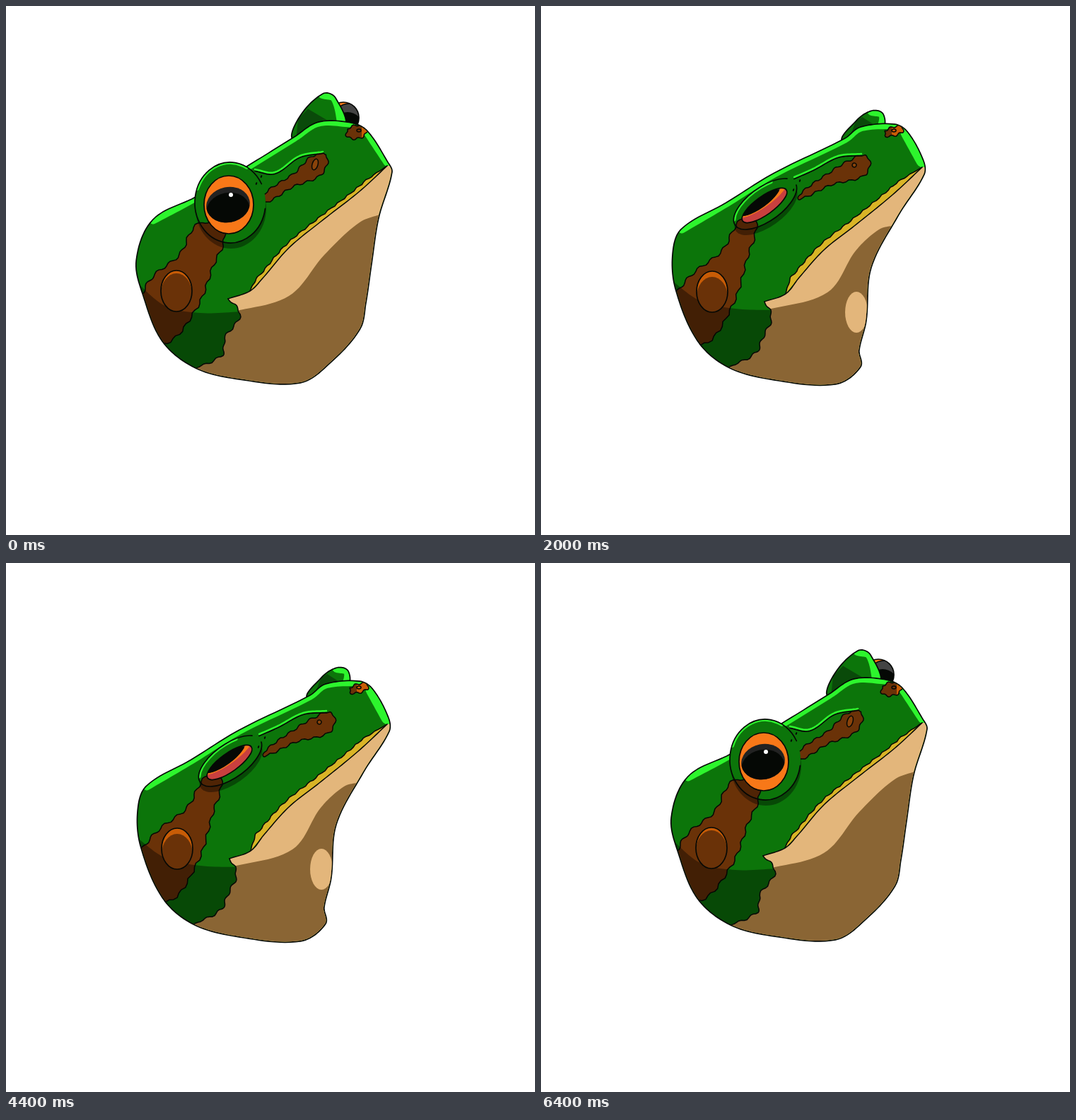
Animation, 748 px wide and 748 px high, one loop 6.5 s. Source, as an HTML page with a canvas:

```html
<!DOCTYPE html>
<html lang="en">
<head>
<meta charset="utf-8">
<title>Croaking frog</title>
<style>
html, body { margin: 0; width: 100%; height: 100%; overflow: hidden; background: #fff; }
canvas { display: block; width: 100vw; height: 100vh; }
</style>
</head>
<body>
<canvas id="stage" width="748" height="748"></canvas>
<script>
const ctx = document.getElementById('stage').getContext('2d');
const GREEN = '#0c750a', DARK = '#0a4a0a', BRIGHT = '#2df52d', BROWN = '#6a3208', RUST = '#c85c06',
  TAN = '#e3b67b', SHADE = '#8a6534', YELLOW = '#d9b426', ORANGE = '#f87818', PINK = '#c8403f',
  INK = '#050805', SHADOW = 'rgba(0,0,0,.38)';

const points = text => text.split(',').map(p => p.trim().split(' ').map(Number));
const mix = (a, b, t) => Array.isArray(a) ? a.map((v, i) => mix(v, b[i], t)) : a + (b - a) * t;

// Key points of each contour: awake, then with the eyes shut.
const contour = (awake, shut) => [points(awake), points(shut)];
const crown = contour('208 303,268 271,345 225,408 186,442 165,488 166,510 177,539 221',
  '199 316,262 279,330 237,430 188,452 172,500 168,518 179,540 219');
const throat = contour('545 235,526 300,516 365,508 420,500 456,460 502,416 532,330 527',
  '541 238,505 295,466 370,459 445,449 487,451 510,416 534,330 528');
const throatPuffed = points('543 240,512 293,470 343,453 371,430 450,410 521,392 539,330 529');
const nape = contour('268 511,222 474,195 410,185 360', '265 510,222 473,191 400,187 350');
const mouth = contour('539 226,500 262,445 305,400 342,362 386,345 403,314 414',
  '539 228,497 267,443 311,400 345,365 384,346 407,316 418');
const cheek = contour('314 414,331 436,309 470,306 493,266 513', '316 418,326 440,314 468,303 491,265 511');
const bellyShade = contour('535 293,500 306,450 352,400 410,318 433', '500 310,478 316,445 346,405 405,318 430');
const sideShade = contour('180 386,225 424,275 434,335 432', '180 384,225 417,275 428,335 430');
const patch = contour('272 308,245 352,208 382,190 412,175 450,222 478,268 430,292 370,308 318',
  '282 303,256 346,215 378,188 412,175 450,226 480,270 425,292 355,304 305');
const stripe = contour('453 210,446 238,405 256,366 278,366 265,408 236,432 213',
  '461 212,459 238,410 253,366 273,368 264,410 234,435 219');
const noseSpot = contour('484 173,508 170,506 184,484 186', '487 176,510 170,510 179,488 184');
const brow = contour('352 231,380 235,415 212,448 206', '358 242,385 230,420 212,453 209');
const farLid = contour('408 190,413 160,448 124,466 130,477 175', '428 192,445 163,468 148,484 153,482 175');
const pores = contour('361 241,354 251', '366 247,357 260');

// Ellipses: centre, radii, tilt.
const ear = [[241, 403, 22, 29, 0], [242, 404, 22, 29, 0]];
const nostril = [[437, 224, 4, 8, .3], [443, 225, 3, 3, .3]];
const farBall = [[477, 158, 22, 22, 0], [466, 165, 14, 14, 0]];
const lid = [[317, 278, 50, 57, 0], [317, 280, 52, 24, -.62]];
const opening = [[315, 281, 35, 41, 0], [316, 282, 38, 13, -.62]];
const iris = [[315, 281, 35, 41, 0], [312, 272, 44, 13, -.62]];
const pupil = [[314, 281, 31, 25, -.2], [308, 274, 36, 12, -.62]];
const sac = [[410, 440, 48, 48, 0], [432, 448, 73, 73, 0]];
const sacLight = [[446, 433, 16, 29, 0], [453, 446, 52, 66, 0]];

// Samples a smooth curve through the points; wave and shift move it along its normal.
function trace(pts, { closed = false, wave = 0, period = 22, shift = 0 } = {}) {
  const n = pts.length, steps = 12, out = [];
  const at = i => pts[closed ? (i + n) % n : Math.max(0, Math.min(n - 1, i))];
  for (let i = 0; i < (closed ? n : n - 1); i++) {
    const p = at(i - 1), a = at(i), b = at(i + 1), q = at(i + 2);
    const third = Math.hypot(b[0] - a[0], b[1] - a[1]) / 3;
    const handle = (from, to, k) => third / Math.hypot(to[0] - from[0], to[1] - from[1]) * (to[k] - from[k]);
    for (let j = 0; j <= steps; j++) {
      if (j === steps && (closed || i < n - 2)) continue;
      const t = j / steps, u = 1 - t;
      out.push([0, 1].map(k => u ** 3 * a[k] + 3 * u * u * t * (a[k] + handle(p, b, k)) +
        3 * u * t * t * (b[k] - handle(a, q, k)) + t ** 3 * b[k]));
    }
  }
  if (!wave && !shift) return out;
  let travelled = 0;
  return out.map(([x, y], i) => {
    const next = out[i + 1] || out[i], prev = out[i - 1] || out[i];
    const dx = next[0] - prev[0], dy = next[1] - prev[1], len = Math.hypot(dx, dy);
    const t = i / (out.length - 1), taper = closed ? 1 : Math.min(1, 8 * t * (1 - t));
    travelled += len / 2;
    const off = taper * (shift + wave * Math.sin(travelled * 2 * Math.PI / period)) / len;
    return [x - dy * off, y + dx * off];
  });
}

function path(pts, closed = false) {
  const result = new Path2D();
  pts.forEach(p => result.lineTo(...p));
  if (closed) result.closePath();
  return result;
}

function oval([x, y, rx, ry, tilt], from = 0, to = 2 * Math.PI) {
  const result = new Path2D();
  result.ellipse(x, y, rx, ry, tilt, from, to);
  return result;
}

const blob = (pts, options) => path(trace(pts, { closed: true, ...options }), true);
const moved = ([x, y, ...rest], dx, dy) => [x + dx, y + dy, ...rest];

function fill(shape, color) { ctx.fillStyle = color; ctx.fill(shape); }
function line(shape, width = 1.7, color = INK) {
  ctx.lineWidth = width;
  ctx.strokeStyle = color;
  ctx.stroke(shape);
}
function inside(shape, paint) {
  ctx.save();
  ctx.clip(shape);
  paint();
  ctx.restore();
}

function drawFarEye(pose, puff) {
  ctx.save();
  ctx.translate(0, 15 * puff);
  const ball = pose(farBall), globe = oval(ball), dark = oval(moved(ball, 8, 2));
  fill(globe, ORANGE);
  inside(globe, () => {
    fill(dark, '#444');
    fill(oval(moved(ball, 6, 14)), INK);
    line(dark);
  });
  line(globe);
  const rim = pose(farLid), shape = blob(rim);
  fill(shape, GREEN);
  inside(shape, () => {
    line(path(trace(rim.slice(2, 5))), 14, BRIGHT);
    fill(path([[rim[0][0], 210], rim[1], mix(rim[1], rim[2], .4), rim[4], [rim[4][0], 210]], true), DARK);
  });
  line(shape);
  ctx.restore();
}

function drawBelly(pose, puff, s) {
  const jaw = trace(pose(mouth)), side = trace(pose(cheek), { wave: 1.8, period: 20 });
  const gum = pose(mouth).slice(0, -1);
  const lip = trace(gum, { shift: 6 + 3 * s, wave: 1, period: 17 });
  fill(path([...lip, ...trace(gum).reverse()], true), YELLOW);
  line(path(lip), 1.5);
  const belly = path([...jaw, ...side, [266, 570], [600, 570], [600, 226]], true);
  fill(belly, TAN);
  inside(belly, () => {
    fill(path([...trace(pose(bellyShade)), [240, 433], [240, 570], [600, 570], [600, 293]], true), SHADE);
    const [x, y, rx, ry] = mix(...sacLight, puff), grown = Math.max(0, 2 * s - 1);
    fill(oval([x, y, rx * grown, ry * grown, 0]), TAN);
    fill(oval([483, 434, 19 * puff, 34 * puff, -.15]), '#eed9ba');
    if (puff > .5) line(path(trace([[370, 508], [387, 517], [412, 521]])));
  });
  line(path(jaw), 1.5);
  line(path(side), 1.5);
}

function drawNearEye(pose, eye, puff, marking) {
  const rim = pose(lid), shape = oval(rim);
  fill(oval(moved(rim, 1, 8)), SHADOW);
  fill(shape, GREEN);
  inside(shape, () => {
    fill(marking, '#4f2405');
    line(marking, 1.5);
    line(oval(rim, 3.5, 5.2), 6, BRIGHT);
  });
  line(oval(rim, .15, 5.8));

  const slit = oval(eye(opening)), ball = moved(eye(pupil), -6 * puff, -8 * puff), dark = oval(ball);
  fill(slit, PINK);
  inside(slit, () => {
    fill(oval(moved(eye(iris), -6 * puff, -8 * puff)), ORANGE);
    fill(dark, '#222');
    inside(dark, () => fill(oval(moved(ball, 0, 8)), INK));
    if (ball[3] > 19) fill(oval([318, 267, 3, 3, 0]), '#fff');
  });
  line(slit);
}

function drawFrog(s, puff) {
  const pose = ([awake, shut]) => mix(awake, shut, s);
  const eye = ([awake, shut]) => mix(awake, shut, s ** 1.6);
  drawFarEye(pose, puff);

  const top = pose(crown);
  const head = blob([...top, ...mix(pose(throat), throatPuffed, puff), ...pose(nape)]);
  head.addPath(oval(mix(...sac, puff)));
  line(head, 3.4);
  fill(head, GREEN);
  const marking = blob(pose(patch), { wave: 2 });
  inside(head, () => {
    line(path(trace(top.slice(0, 6))), 11, BRIGHT);
    line(path(trace(top.slice(6))), 11 + 8 * s, BRIGHT);

    fill(marking, BROWN);
    line(marking, 1.5);
    fill(path([...trace(pose(sideShade)), [335, 570], [180, 570]], true), SHADOW);
    const drum = oval(pose(ear));
    fill(drum, RUST);
    inside(drum, () => fill(oval(moved(pose(ear), 0, 4 + 4 * s)), BROWN));
    line(drum);

    const streak = blob(pose(stripe), { wave: 1.5, period: 17 });
    fill(streak, BROWN);
    line(streak, 1.5);
    const hole = oval(pose(nostril));
    fill(hole, '#8a430a');
    line(hole, 1.5);

    const spot = blob(pose(noseSpot), { wave: 1.5, period: 12 });
    fill(spot, BROWN);
    inside(spot, () => { ctx.fillStyle = RUST; ctx.fillRect(503 - 7 * s, 160, 30, 30); });
    line(spot, 1.5);
    line(oval([499, 176, 3, 2, 0]), 1.5);

    const ridge = trace(pose(brow));
    line(path(ridge.map(([x, y]) => [x, y + 2.5])));
    line(path(ridge), 2.5, BRIGHT);
    drawBelly(pose, puff, s);
  });
  drawNearEye(pose, eye, puff, marking);
  pose(pores).forEach(p => fill(oval([...p, 1, 2, .4]), INK));
}

// Eyes shut over four steps, the throat swells over four more, then all of it runs back.
function draw() {
  const step = Math.floor(performance.now() / 100) % 65 % 16;
  const depth = Math.min(step, 16 - step);
  ctx.fillStyle = '#fff';
  ctx.fillRect(0, 0, 748, 748);
  ctx.lineJoin = ctx.lineCap = 'round';
  drawFrog(Math.min(1, depth / 4), Math.min(1.1, Math.max(0, (depth - 4) / 3)));
  requestAnimationFrame(draw);
}
draw();
</script>
</body>
</html>
```
